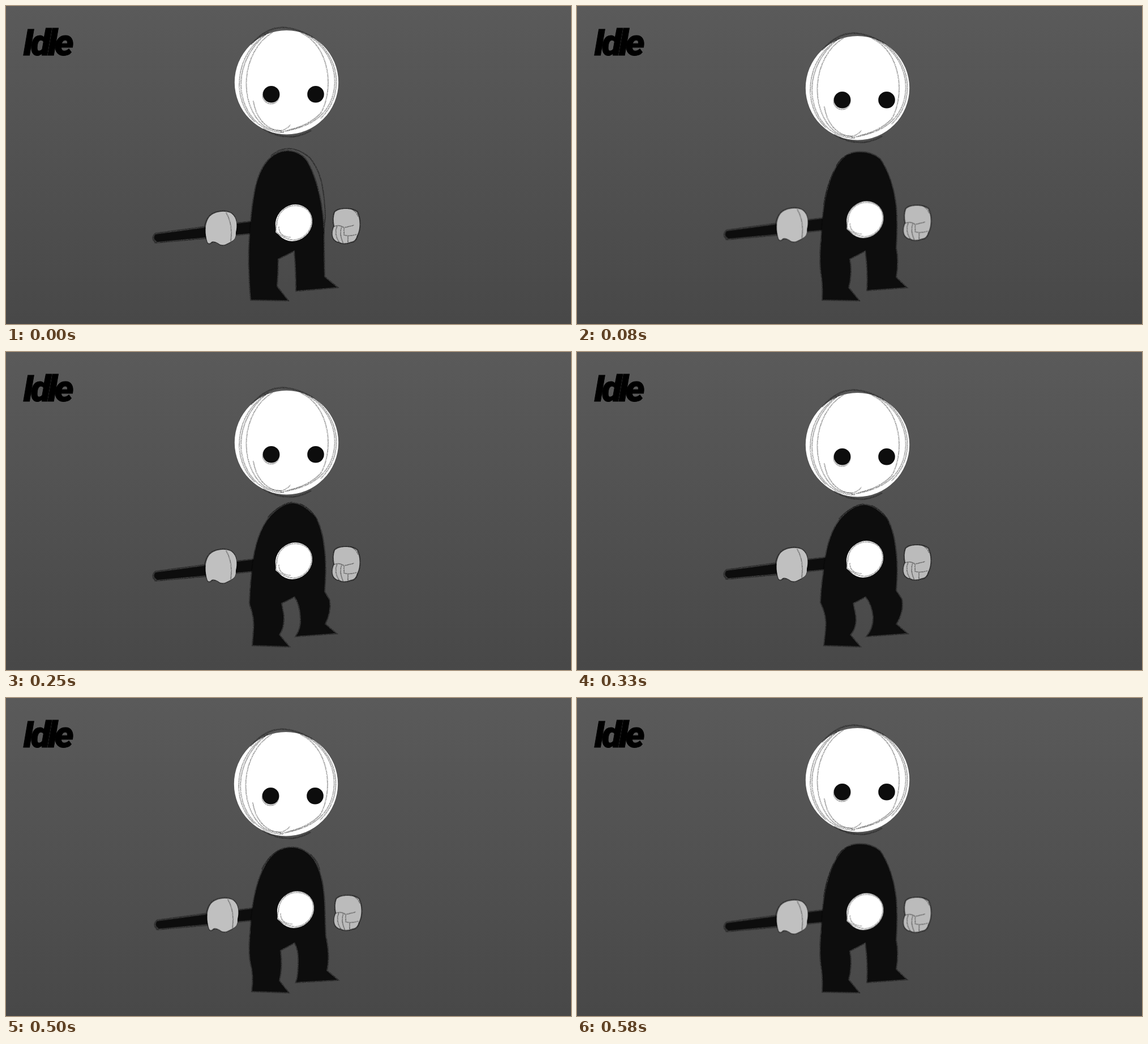
These frames come from a looping animation (998 px wide and 561 px high, 660 ms). An HTML page:

```html
<!DOCTYPE html>
<html lang="en">
<head>
<meta charset="utf-8">
<title>Idle</title>
<style>
  html, body { margin: 0; width: 100%; height: 100%; overflow: hidden; background: #505050; }
  svg { display: block; width: 100%; height: 100%; }
  text { font: italic 900 64px Roboto, "Open Sans", sans-serif; letter-spacing: -5px; }
  .ink { fill: #0d0d0d; }
  .pencil { fill: none; stroke: #000; stroke-opacity: .45; stroke-width: 2.2; stroke-linecap: round; filter: url(#grain); }
  .rim { stroke-width: 4; }
  .fine { stroke-width: 1.7; }
  .faint { stroke-opacity: .38; stroke-width: 2; }

  .head, .arms, .body, .loose { animation: 660ms step-end infinite; }
  .head { animation-name: head; }
  .arms { animation-name: arms; }
  .body { animation-name: body; }
  .loose { animation-name: loose; }

  /* Down through five poses and back up again. */
  @keyframes head {
    0%, 100% { transform: translate(0, 0); }
    12.1%, 87.8% { transform: translate(0, 10px); }
    24.2%, 75.7% { transform: translate(-1px, 17px); }
    37.8%, 62.1% { transform: translate(0, 25px); }
    49.9% { transform: translate(0, 29px); }
  }
  @keyframes arms {
    0%, 100% { transform: translate(0, 0); }
    12.1%, 87.8% { transform: translate(.3px, -5.7px); }
    24.2%, 75.7% { transform: translate(3px, -9.2px); }
    37.8%, 62.1% { transform: translate(0, -14px); }
    49.9% { transform: translate(0, -17px); }
  }
  @keyframes body {
    0%, 100% { d: path("M497 256C468 257 449 284 441 322C433 358 428 430 430 465Q431 500 433 518L497 519L478 495Q480 470 480 446L510 431Q513 470 513 502L584 496L562 478Q561 440 561 400C560 350 548 304 532 275Q520 257 497 256Z"); }
    12.1%, 87.8% { d: path("M501 258C477 257 463 272 452 298C437 334 434 370 432 410C429 440 430 465 433 480Q435 500 434 518L497 519L479 497Q486 470 481 446L510 431Q515 470 513 501L581 496L563 479Q568 450 563 427Q566 385 563 352C558 312 547 288 535 270Q520 258 501 258Z"); }
    24.2%, 75.7% { d: path("M504 264C480 264 464 282 455 302C438 336 434 380 432 412Q429 445 432 465Q439 490 435 517L498 519L482 499Q488 475 484 445L510 431Q518 445 517 465Q517 490 513 501L585 497L566 481Q572 455 564 420Q563 395 562 360C560 320 552 300 543 285Q527 264 504 264Z"); }
    37.8%, 62.1% { d: path("M506 267Q488 268 468 289C448 312 439 345 435 385Q431 425 431 445Q440 468 438 490L436 517L499 519L482 499Q491 487 490 465L486 443L510 431Q520 445 521 470Q522 488 513 501L582 496L563 480Q574 458 571 438L562 423Q565 385 563 360C560 320 552 300 545 290Q524 267 506 267Z"); }
    49.9% { d: path("M507 270Q488 271 468 292C448 315 440 348 436 388Q431 424 431 442Q443 466 440 490L437 517L499 519L482 499Q495 484 491 462L487 443L510 431Q522 445 524 468Q524 488 513 501L582 496L563 480Q577 458 573 436L563 421Q566 385 564 363C561 323 553 303 546 293Q525 270 507 270Z"); }
  }
  @keyframes loose {
    0%, 100% { d: path("M468 264Q500 238 536 267C554 288 562 315 564 372L561 400"); }
    12.1%, 87.8% { d: path("M458 282Q466 267 480 262M453 293Q440 320 436 350"); }
    24.2%, 75.7% { d: path("M452 302Q464 277 484 268M538 276Q551 287 554 303"); }
    37.8%, 62.1% { d: path("M463 291Q484 268 505 265M520 268Q540 277 549 296"); }
    49.9% { d: path("M463 294Q484 271 506 268M521 271Q541 280 550 299"); }
  }
</style>
</head>
<body>
<svg viewBox="0 0 998 561" preserveAspectRatio="none">
  <defs>
    <linearGradient id="wall" x2="0" y2="1">
      <stop stop-color="#5a5a5a"/>
      <stop offset="1" stop-color="#484848"/>
    </linearGradient>
    <filter id="grain" x="-10%" y="-10%" width="120%" height="120%" color-interpolation-filters="sRGB">
      <feTurbulence type="fractalNoise" baseFrequency=".8" numOctaves="2" seed="4"/>
      <feColorMatrix values="0 0 0 0 0  0 0 0 0 0  0 0 0 0 0  0 0 0 3 -.7"/>
      <feComposite in="SourceGraphic" operator="in"/>
    </filter>
  </defs>

  <rect width="998" height="561" fill="url(#wall)"/>
  <text x="30" y="87" stroke="#000">Idle</text>

  <g class="arms">
    <path class="pencil rim" d="M440 380L353 390L264 402Q257 409 264 417L354 409L440 400"/>
    <path class="ink" d="M440 380L353 391L264 403Q258 410 267 416L354 408L440 400Z"/>
  </g>

  <path class="pencil rim body"/>
  <path class="ink body"/>
  <path class="pencil loose"/>

  <g class="arms">
    <ellipse cx="508.5" cy="382.5" rx="34" ry="31" fill="#fff" transform="rotate(-42 508.5 382.5)"/>
    <path d="M477 387L476 399L487 408L492 392Z" fill="#fff"/>
    <path class="pencil faint" d="M478 388C478 364 494 352 512 352C530 353 540 363 540 380C539 399 524 412 508 413Q489 411 477 398L477 388M482 390Q482 407 502 408"/>

    <path class="pencil" stroke-width="3" d="M356 417C349 400 349 385 357 373C366 360 389 359 399 366C409 374 409 392 406 404Q403 415 390 420Q381 425 374 418Q367 415 362 418Q358 421 356 417"/>
    <path d="M356 417C351 402 351 385 358 374C366 362 388 360 398 366C408 373 409 388 406 399Q407 412 397 416L389 420Q381 424 374 418Q367 414 363 416Q359 421 356 417Z" fill="#c0c0c0"/>
    <path class="pencil faint" d="M389 365Q401 385 397 415"/>

    <path class="pencil" stroke-width="3" d="M580 363C588 355 612 355 621 363C627 376 627 394 621 405Q618 417 609 417Q597 422 588 417C577 416 573 404 579 389Q576 374 580 363"/>
    <path d="M581 364C588 356 612 356 620 364C626 376 626 394 620 405Q617 416 609 416Q597 421 588 416C578 415 573 403 580 388Q577 374 581 364Z" fill="#bbb"/>
    <path class="pencil fine" d="M579 389Q588 385 597 391L614 387M585 388Q579 402 588 416M593 389Q588 402 595 417M597 391V404Q606 407 619 403M604 406L604 417M610 358Q618 362 622 371"/>
  </g>

  <g class="head">
    <circle cx="495.5" cy="134.7" r="91.7" fill="#fff"/>
    <g class="pencil faint">
      <path d="M470 47C414 82 410 175 456 212Q470 220 486 220"/>
      <path d="M463 47C402 85 398 165 439 204"/>
      <path d="M458 51C402 98 404 172 446 208Q466 223 490 223"/>
      <path d="M521 47C574 72 579 150 556 189Q535 211 498 219"/>
      <path d="M530 50C586 82 594 148 562 187Q539 214 486 222"/>
      <path d="M540 54C594 92 596 160 556 198"/>
      <path d="M437 168C443 205 467 220 485 220Q496 218 502 210"/>
      <path d="M434 67Q460 38 488 38Q512 38 541 55M455 217Q498 243 538 220" stroke-width="3"/>
    </g>
    <circle class="pencil faint" cx="468" cy="158" r="14.5"/>
    <circle class="ink" cx="468.6" cy="155.8" r="14.8"/>
    <circle class="ink" cx="547" cy="155.8" r="14.8"/>
  </g>
</svg>
</body>
</html>
```
